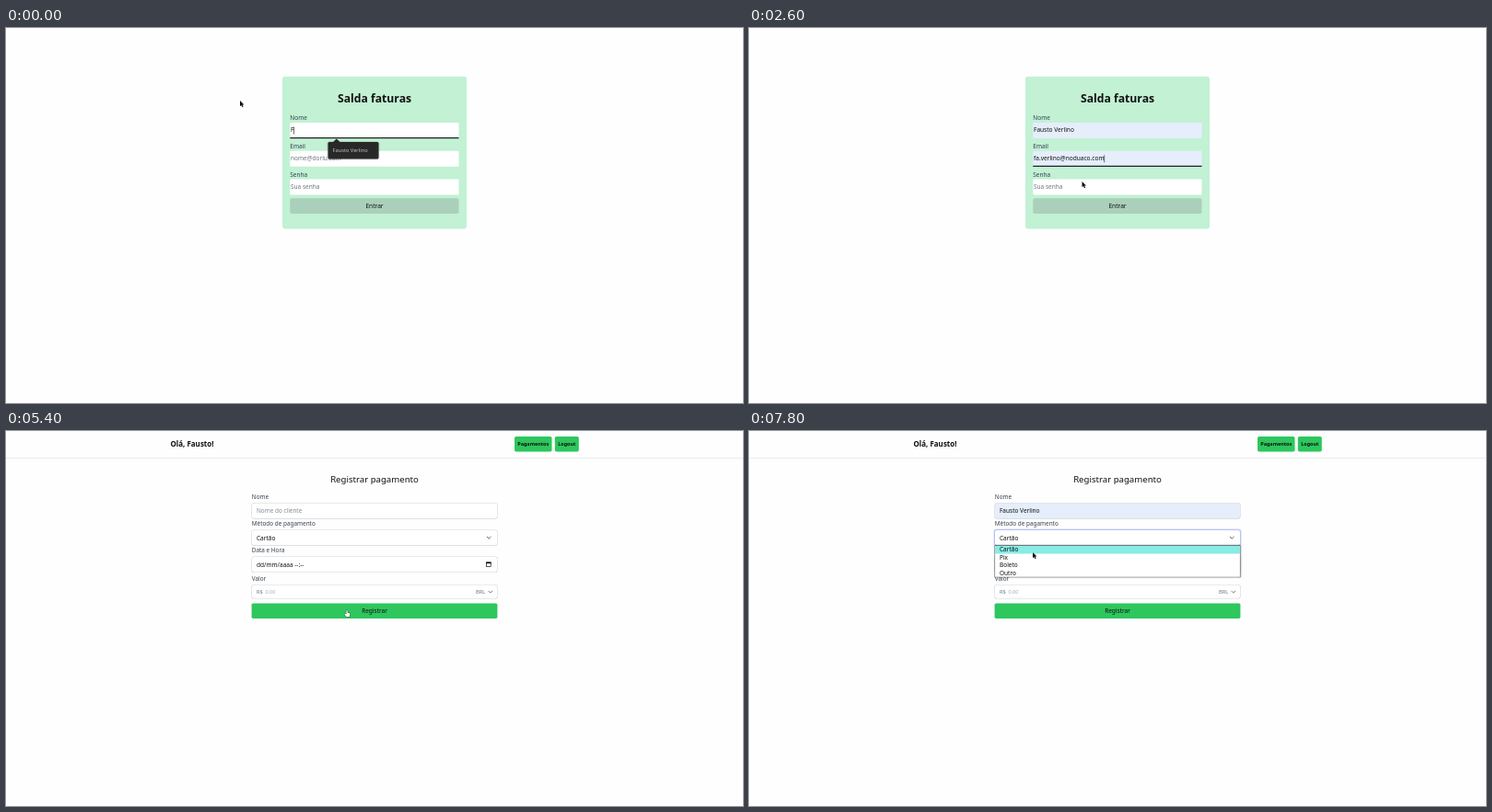
Write an HTML page with a canvas that moves like this. It is 800 px wide and 408 px high and loops after 8000 ms.

```html
<!DOCTYPE html>
<html lang="pt-BR">
<head>
<meta charset="utf-8">
<title>Registrar pagamento</title>
<style>
html, body { margin: 0; width: 100%; height: 100%; overflow: hidden; background: #fefefe; }
canvas { display: block; width: 800px; height: 408px; }
</style>
</head>
<body>
<canvas id="stage" width="800" height="408"></canvas>
<script>
const ctx = document.getElementById('stage').getContext('2d');
const LOOP = 8000, STEP = 200;
const SANS = '"Noto Sans", "Open Sans", sans-serif';
const ARIAL = '"Liberation Sans", Arial, sans-serif';
const GREEN = '#2dc75d', INK = '#111', GRAY = '#6f757d', LABEL = '#374151';
const AUTOFILL = '#e5eefa', CYAN = '#86ece4', DARK = '#282828';

const NAME = 'Fausto Verlino';
const MAILS = ['fa.verlino@noduaco.com', 'fa.verlino@plunado.com', 'tonica@entregalume.com',
  'tarulita@dorlu.com', 'tarulita@do2rlu.com', 'walter@bremonindustrial.com'];
const CLIENTS = ['nestornestornestor', NAME, 'nestor', 'asdasd', '123', 'nestor nestor nestor'];
const METHODS = ['Cartão', 'Pix', 'Boleto', 'Outro'];

// time, x, y, pointer shape from that time on
const PATH = [
  [0, 254, 79, 'arrow'], [1000, 254, 79, 'arrow'], [1400, 357, 134, 'beam'],
  [1600, 361, 139, 'beam'], [1800, 364, 148, 'arrow'], [2200, 373, 164, 'arrow'],
  [2400, 372, 163, 'arrow'], [2800, 351, 171, 'beam'], [3000, 344, 174, 'beam'],
  [3200, 344, 174, 'beam'], [3400, 334.5, 188, 'arrow'], [3800, 284, 227, 'arrow'],
  [4000, 268, 231, 'arrow'], [4400, 274, 231, 'arrow'], [4600, 286.5, 228, 'arrow'],
  [5000, 370, 194, 'hand'], [5200, 371, 195, 'arrow'], [5400, 370, 195, 'hand'],
  [5600, 362, 178, 'arrow'], [6000, 324, 90, 'beam'], [6400, 320, 89, 'beam'],
  [6600, 319, 101, 'arrow'], [7000, 318.5, 123, 'arrow'], [7200, 318, 122, 'arrow'],
  [7400, 312, 116, 'arrow'], [7600, 307, 119, 'arrow'], [7800, 308, 132, 'arrow']
];

function rect(x, y, w, h, color, r = 0) {
  ctx.fillStyle = color;
  ctx.beginPath();
  ctx.roundRect(x, y, w, h, r);
  ctx.fill();
}

function text(str, x, y, size, color = INK, { weight = 400, align = 'left', family = SANS } = {}) {
  ctx.font = `${weight} ${size}px ${family}`;
  ctx.textAlign = align;
  ctx.fillStyle = color;
  ctx.fillText(str, x, y);
  return ctx.measureText(str).width;
}

function line(points, color, width) {
  ctx.strokeStyle = color;
  ctx.lineWidth = width;
  ctx.beginPath();
  points.forEach(([x, y]) => ctx.lineTo(x, y));
  ctx.stroke();
}

const caret = (x, y) => rect(x, y - 4, 0.6, 8, INK);

function popup(x, y, w, rows, hover = -1, color = '#c2c2c2') {
  const h = rows.length * 15 + 3.5;
  ctx.save();
  ctx.shadowColor = 'rgba(0,0,0,.35)';
  ctx.shadowBlur = 2;
  rect(x, y, w, h, DARK, 1.5);
  ctx.restore();
  ctx.fillStyle = DARK;
  ctx.beginPath();
  ctx.moveTo(x + 5.5, y);
  ctx.lineTo(x + 9.3, y - 3.6);
  ctx.lineTo(x + 13.1, y);
  ctx.fill();
  rows.forEach((row, i) => {
    const mid = y + 9 + i * 15;
    if (i === hover) rect(x, mid - 7.5, w, 15, CYAN);
    text(row, x + 5, mid + 2, 5.7, i === hover ? '#b4cfcc' : color);
  });
}

// value: { str, fill, preview, focus, dots }
function loginField(label, y, placeholder, { str = '', fill, preview, focus, dots = 0 }) {
  text(label, 308.3, y - 3, 6.5, LABEL);
  rect(308.3, y, 183.2, 17, fill ? AUTOFILL : '#fff', 1);
  let width = 0;
  if (dots) {
    for (let i = 0; i < dots; i++) {
      ctx.fillStyle = INK;
      ctx.beginPath();
      ctx.arc(310.4 + i * 2.4, y + 8.4, 0.95, 0, 7);
      ctx.fill();
    }
    width = dots * 2.4;
  } else if (str) {
    width = preview ? text(str, 309, y + 10.3, 5.55, INK, { family: ARIAL })
                    : text(str, 309, y + 10.3, 6.55);
  } else {
    text(placeholder, 309, y + 10.3, 6.5, GRAY);
  }
  if (focus) {
    rect(308.3, y + 16, 183.2, 1.3, '#202020');
    caret(309 + (preview ? 0 : width), y + 8.4);
  }
}

function loginPage(t) {
  rect(300, 52.7, 200, 165.8, '#c2f1d4', 3);
  text('Salda faturas', 400, 81, 12.2, INK, { weight: 700, align: 'center' });

  const named = t >= 200, mailHover = t >= 2000 && t < 2400;
  const focus = t < 600 ? 0 : t < 2800 ? 1 : 2;
  const dots = t < 3800 ? 0 : Math.min(7, Math.floor((t - 3800) / STEP) * 2 + 1);
  const ready = dots === 7;

  loginField('Nome', 103, '', { str: named ? NAME : 'F', fill: named, focus: focus === 0 });
  loginField('Email', 133.8, 'nome@dorlu.com',
    { str: t >= 2000 ? MAILS[0] : '', fill: t >= 2000, preview: mailHover, focus: focus === 1 });
  loginField('Senha', 164.6, 'Sua senha', { dots, focus: focus === 2 });

  rect(308.3, 185.2, 183.2, 16.8, ready ? GREEN : '#aad0bb', 1.8);
  text('Entrar', 400, 196, 6.6, INK, { align: 'center' });

  if (!named) popup(349.5, 124, 55, [NAME]);
  if (t >= 1600 && t < 2400) popup(349.5, 154.8, 95, MAILS, mailHover ? 0 : -1);
  if (t >= 3000 && t < 3800) {
    popup(349.5, 185.6, 140.5, ['']);
    rect(354.8, 191.4, 6.6, 6.6, '#4285f4', 3.3);
    text('Usar senhas salvas na sua Conta do Velqua', 366, 196.7, 5.64, '#707070');
  }
}

function payField(label, y, h, { fill = '#fff', focus } = {}) {
  text(label, 266.8, y - 4.3, 6.4, LABEL);
  if (focus) rect(265.6, y - 0.9, 268.8, h + 1.8, '#cdd5fa', 3);
  rect(266.4, y, 267.2, h, focus ? '#a4b4f2' : '#d3d6da', 2.6);
  rect(267, y + 0.6, 266, h - 1.2, fill, 2.1);
}

const chevron = (x, y, color) =>
  line([[x - 2.3, y - 1.1], [x, y + 1.2], [x + 2.3, y - 1.1]], color, 0.9);

function payPage(t) {
  const focus = t < 6200 ? '' : t < 7600 ? 'name' : 'method';
  const open = t >= 6400 && t < 7200;
  const hover = !open || t < 6600 ? -1 : t < 7000 ? 0 : 1;

  text('Olá, Fausto!', 178.4, 17.2, 8, INK, { weight: 600 });
  rect(552, 6, 40.5, 16.6, GREEN, 1.8);
  rect(595.8, 6, 26, 16.6, GREEN, 1.8);
  text('Pagamentos', 572.2, 16.3, 5.45, INK, { weight: 700, align: 'center' });
  text('Logout', 608.8, 16.3, 5.45, INK, { weight: 700, align: 'center' });
  rect(0, 29, 800, 0.7, '#e3e5e7');
  text('Registrar pagamento', 400, 56.2, 9.62, INK, { align: 'center' });

  const filled = t >= 7200, preview = hover >= 0;
  payField('Nome', 78.2, 17.5, { fill: filled || preview ? AUTOFILL : '#fff', focus: focus === 'name' });
  if (filled) text(NAME, 272, 89.3, 6.5);
  else if (preview) text(CLIENTS[hover], 272, 89.3, 5.55, INK, { family: ARIAL });
  else text('Nome do cliente', 272, 89.3, 6.4, '#858b94');
  if (focus === 'name') caret(filled ? 317 : 272, 87);

  payField('Método de pagamento', 107.4, 17.5, { focus: focus === 'method' });
  text('Cartão', 272, 118.5, 6.5);
  chevron(524.2, 116, '#4b5563');

  payField('Data e Hora', 136.5, 17.5);
  text('dd/mm/aaaa --:--', 272, 147.8, 6.5);
  ctx.strokeStyle = INK;
  ctx.lineWidth = 0.7;
  ctx.strokeRect(521.4, 143, 4.8, 4.6);
  rect(521.1, 142.6, 5.4, 1.6, INK);

  payField('Valor', 167, 15.5);
  text('R$', 272, 177, 5.7, GRAY);
  text('0.00', 281.5, 177, 5.5, '#a3a9b2');
  text('BRL', 510, 177, 5.8, GRAY);
  chevron(525.8, 175, GRAY);

  rect(266.6, 187.4, 266.8, 16.6, GREEN, 1.8);
  text('Registrar', 400, 198.2, 6.5, INK, { align: 'center' });

  if (open) popup(308, 99, 70, CLIENTS, hover);
  if (focus === 'method') methodList();
}

function methodList() {
  ctx.save();
  ctx.shadowColor = 'rgba(0,0,0,.3)';
  ctx.shadowBlur = 2;
  rect(266.5, 124.3, 267, 35, '#666');
  ctx.restore();
  rect(267.1, 124.9, 265.8, 33.8, '#fff');
  rect(267.1, 124.9, 265.8, 8.5, CYAN);
  METHODS.forEach((m, i) => text(m, 272, 131.2 + i * 8.5, 6.5));
}

const SHAPES = {
  arrow: 'M0 0V6.2L1.5 4.9 2.5 7.2 3.6 6.7 2.6 4.5H4.5Z',
  hand: 'M-.6 .2Q0 -.6 .6 .2V2.6L3 3.2Q3.6 3.5 3.4 4.4L2.8 7.3H-.6L-2.6 4.4Q-2.4 3.3 -.6 4.4Z'
};

function pointer(t) {
  let i = PATH.length - 1;
  while (PATH[i][0] > t) i--;
  const [t0, x0, y0, kind] = PATH[i];
  const [t1, x1, y1] = PATH[i + 1] || [LOOP, x0, y0];
  const k = (t - t0) / (t1 - t0);
  ctx.save();
  ctx.translate(x0 + (x1 - x0) * k, y0 + (y1 - y0) * k);
  if (kind === 'beam') {
    rect(-0.4, -3.5, 0.8, 7, '#333');
    rect(-1.6, -3.9, 3.2, 0.7, '#333');
    rect(-1.6, 3.2, 3.2, 0.7, '#333');
  } else {
    const shape = new Path2D(SHAPES[kind]), hand = kind === 'hand';
    ctx.lineWidth = hand ? 0.7 : 1;
    ctx.strokeStyle = hand ? '#111' : '#fff';
    ctx.fillStyle = hand ? '#fff' : '#111';
    ctx.stroke(shape);
    ctx.fill(shape);
  }
  ctx.restore();
}

function draw(now) {
  const t = Math.floor((now % LOOP) / STEP) * STEP;
  rect(0, 0, 800, 408, '#fefefe');
  (t < 5200 ? loginPage : payPage)(t);
  pointer(t);
}

const start = performance.now();
function tick() {
  draw(performance.now() - start);
  requestAnimationFrame(tick);
}
tick();
</script>
</body>
</html>
```
